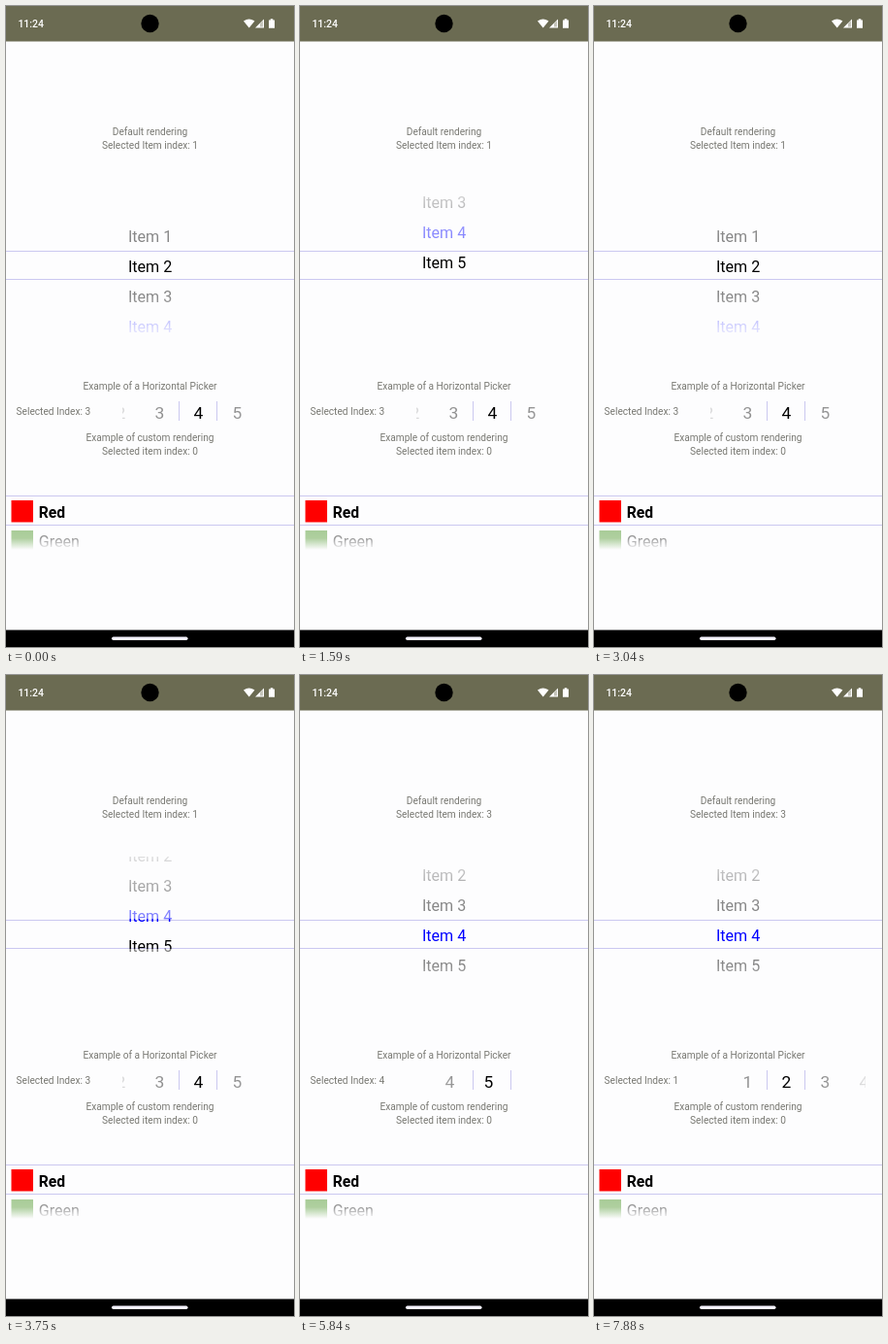
Animation, 297 px wide and 660 px high, one loop 8 s. Source, as an HTML page:

```html
<!DOCTYPE html>
<html lang="en">
<head>
<meta charset="utf-8">
<title>Wheel pickers</title>
<style>
  html, body { margin: 0; width: 297px; height: 660px; overflow: hidden; background: #fdfdfe; }
  svg { display: block; font-family: Roboto, sans-serif; }
  stop { stop-color: #fff; }
  .label { font-size: 10.15px; fill: #787872; }
  .mid { text-anchor: middle; }
  .item { font-size: 16.1px; }
  .digit { font-size: 17.4px; }
  .line { stroke: #cbc8f0; }
</style>
</head>
<body>
<svg width="297" height="660" viewBox="0 0 297 660">
  <defs>
    <linearGradient id="fadeY" gradientUnits="userSpaceOnUse" x1="0" y1="187" x2="0" y2="347">
      <stop offset="0" stop-opacity=".12"/>
      <stop offset=".3" stop-opacity=".46"/>
      <stop offset=".4" stop-opacity=".5"/>
      <stop offset=".4" stop-opacity="1"/>
      <stop offset=".595" stop-opacity="1"/>
      <stop offset=".595" stop-opacity=".5"/>
      <stop offset=".7" stop-opacity=".46"/>
      <stop offset="1" stop-opacity="0"/>
    </linearGradient>
    <linearGradient id="fadeX" gradientUnits="userSpaceOnUse" x1="118" y1="0" x2="278" y2="0">
      <stop offset="0" stop-opacity=".12"/>
      <stop offset=".25" stop-opacity=".42"/>
      <stop offset=".378" stop-opacity=".5"/>
      <stop offset=".378" stop-opacity="1"/>
      <stop offset=".622" stop-opacity="1"/>
      <stop offset=".622" stop-opacity=".5"/>
      <stop offset=".75" stop-opacity=".42"/>
      <stop offset="1" stop-opacity=".12"/>
    </linearGradient>
    <linearGradient id="fadeColor" gradientUnits="userSpaceOnUse" x1="0" y1="536" x2="0" y2="560">
      <stop offset="0" stop-opacity=".44"/>
      <stop offset=".5" stop-opacity=".4"/>
      <stop offset="1" stop-opacity="0"/>
    </linearGradient>
    <mask id="maskY" maskUnits="userSpaceOnUse" x="0" y="187" width="297" height="149">
      <path fill="url(#fadeY)" d="M0 187h297v149H0z"/>
    </mask>
    <mask id="maskX" maskUnits="userSpaceOnUse" x="120" y="400" width="160" height="36">
      <path fill="url(#fadeX)" d="M120 400h160v36H120z"/>
    </mask>
    <mask id="maskColor" maskUnits="userSpaceOnUse" x="0" y="536" width="297" height="24">
      <path fill="url(#fadeColor)" d="M0 536h297v24H0z"/>
    </mask>
  </defs>

  <path fill="#fdfdfe" d="M0 0h297v660H0z"/>

  <path fill="#6b6b52" d="M0 0h297v36.400H0z"/>
  <circle cx="148.500" cy="18" r="9.200"/>
  <g fill="#fff">
    <text x="12.400" y="22.300" font-size="10.500" font-weight="500">11:24</text>
    <path d="M245 15.500q5.700-4 11.400 0l-5.700 7z"/>
    <path d="M271 14.500h1.700v-1.200h2.600v1.200h1.700v8.200h-6z"/>
    <path d="M257 22.500l9-9v9z"/>
  </g>
  <path fill="#6b6b52" d="M262 21.500v-3.500l3-3v6.500z" opacity=".4"/>

  <g class="label mid">
    <text x="148.500" y="132.700">Default rendering</text>
    <text x="148.500" y="146.700" id="indexY"></text>
    <text x="148.500" y="394.700">Example of a Horizontal Picker</text>
    <text x="148.500" y="447.700">Example of custom rendering</text>
    <text x="148.500" y="461.700">Selected item index: 0</text>
  </g>
  <text class="label" x="10.600" y="421.300" id="indexX"></text>

  <path class="line" d="M0 252.500h297M0 281.500h297M0 504.500h297M0 534.500h297M178.500 407v20M217.500 407v20"/>
  <g mask="url(#maskY)"><g id="column" class="item mid"></g></g>
  <g mask="url(#maskX)"><g id="row" class="digit mid"></g></g>

  <path fill="red" d="M5.500 509h22.500v22.500H5.500z"/>
  <text class="item" x="33.700" y="526.500" font-weight="700" style="font-size:15.700px">Red</text>
  <g mask="url(#maskColor)">
    <path fill="#388a10" d="M5.500 540h22.500v22H5.500z"/>
    <text class="item" x="33.700" y="557.300">Green</text>
  </g>

  <path d="M0 642.600h297V660H0z"/>
  <rect x="109" y="649.500" width="78.500" height="3.500" rx="1.700" fill="#f6f4ff"/>
</svg>
<script>
const LOOP = 8000, STEP_Y = 31, STEP_X = 40;
const byId = id => document.getElementById(id);

// Moves: [start, end, target position]; the lists can overshoot slightly at their end.
const movesY = [[860, 1670, 5.11], [2380, 2960, 2], [3480, 4060, 5.11], [4300, 4720, 4]];
const movesX = [[5400, 5720, 5.1], [5960, 7000, 2]];
// Index labels update after the scroll settles: [time, index].
const indexesY = [[0, 1], [1680, 4], [2960, 1], [4080, 4], [4940, 3]];
const indexesX = [[0, 3], [5740, 4], [7020, 1]];

function position(moves, start, time) {
  let value = start;
  for (const [from, to, target] of moves) {
    const p = Math.min(1, Math.max(0, (time - from) / (to - from)));
    value += (target - value) * (1 - (1 - p) ** 3);
  }
  return value;
}

const latest = (list, time) => list.filter(([at]) => at <= time).pop()[1];

function addText(parent, text, x, y, fill) {
  const node = document.createElementNS("http://www.w3.org/2000/svg", "text");
  node.setAttribute("x", x);
  node.setAttribute("y", y);
  node.setAttribute("fill", fill);
  node.textContent = text;
  parent.append(node);
}

for (let i = 1; i <= 5; i++) {
  addText(byId("column"), "Item " + i, 148.6, 273.5 + i * STEP_Y, i === 4 ? "#00f" : "#000");
  addText(byId("row"), i, 198.3 + i * STEP_X, 425, "#000");
}

function draw(now) {
  const time = now % LOOP;
  byId("column").setAttribute("transform", `translate(0 ${-STEP_Y * position(movesY, 2, time)})`);
  byId("row").setAttribute("transform", `translate(${-STEP_X * position(movesX, 4, time)} 0)`);
  byId("indexY").textContent = "Selected Item index: " + latest(indexesY, time);
  byId("indexX").textContent = "Selected Index: " + latest(indexesX, time);
  requestAnimationFrame(draw);
}
draw(performance.now());
</script>
</body>
</html>
```
